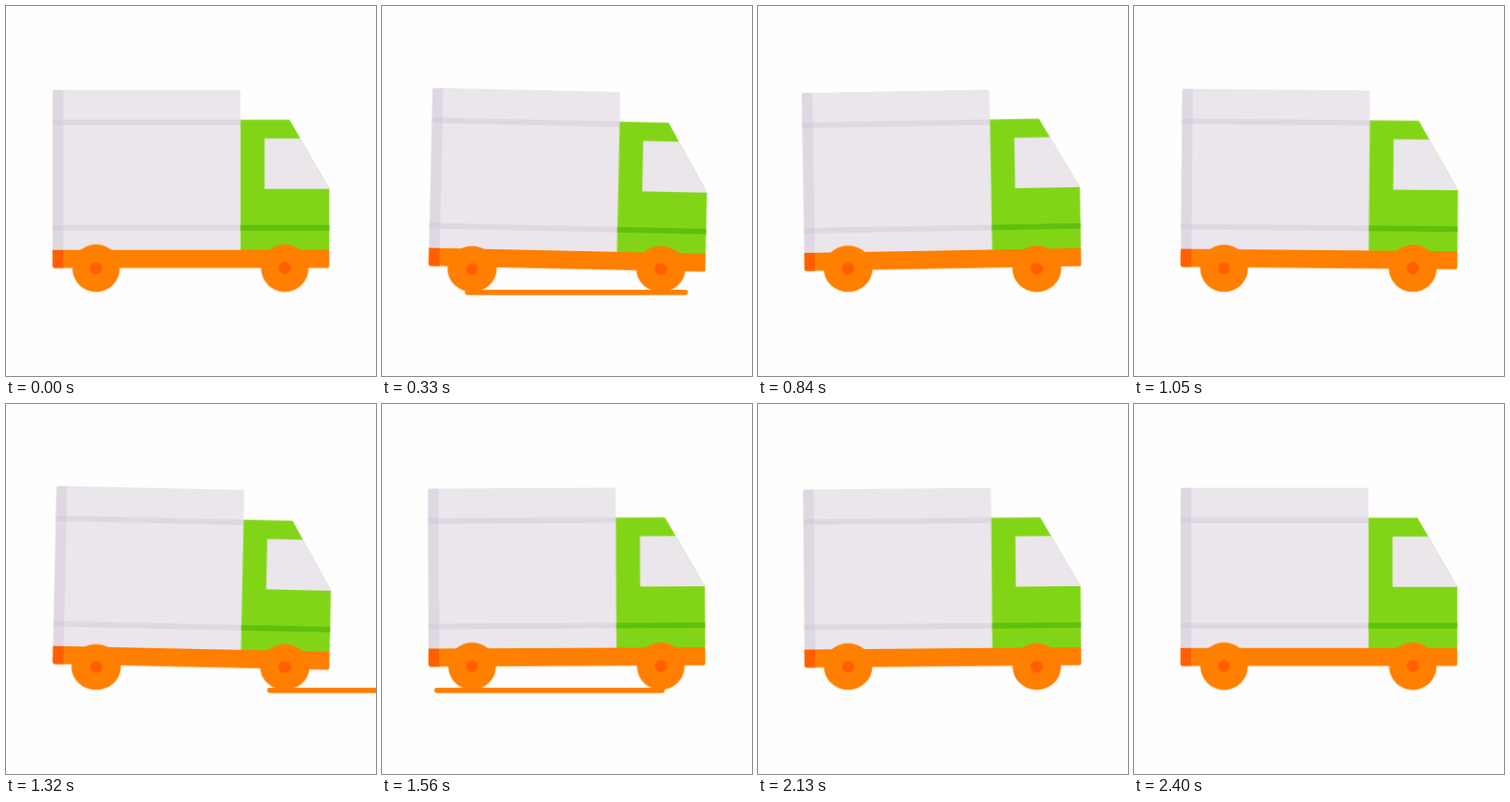
Animation, 400 px wide and 400 px high, one loop 2760 ms. Source, as an HTML page without scripts:

```html
<!DOCTYPE html>
<html lang="en">
<head>
<meta charset="utf-8">
<title>Delivery truck</title>
<style>
  html, body { margin: 0; width: 100%; height: 100%; overflow: hidden; background: #fefefe; }
  svg { display: block; width: 100%; height: 100%; }

  .body, .sway, .wheel, .road { animation: 2760ms cubic-bezier(.37, 0, .63, 1) infinite; }
  .body { animation-name: sink; }
  .sway { animation-name: sway; transform-origin: 200px 283.5px; }
  .wheel { animation-name: squash; transform-origin: 0 25.7px; }
  .road {
    animation-name: pass;
    animation-timing-function: steps(26);
    stroke: #ff7f00; stroke-width: 5.6; stroke-linecap: round;
  }
  .road.second { animation-delay: 1170ms; }

  .panel { fill: #eae6ec; }
  .shade { fill: #c8bcd0; opacity: .32; }
  .green { fill: #82d516; }
  .orange { fill: #ff7f00; }
  .deep { fill: #ff5f00; }

  @keyframes sway {
    0%, 86.96%, 100% { transform: rotate(0deg); }
    9.42% { transform: rotate(1.38deg); }
    26.09% { transform: rotate(-1.32deg); }
    45.29% { transform: rotate(1.32deg); }
    64.86% { transform: rotate(-1.25deg); }
  }
  @keyframes sink {
    0%, 17.75%, 35.69%, 55.07%, 86.96%, 100% { transform: translateY(-.3px); }
    9.42%, 26.09%, 45.29%, 64.86% { transform: translateY(.9px); }
  }
  @keyframes squash {
    0%, 17.75%, 35.69%, 55.07%, 86.96%, 100% { transform: scale(1, 1); }
    9.42%, 26.09%, 45.29%, 64.86% { transform: scale(1.045, .955); }
  }
  /* 26 ticks of 30 ms */
  @keyframes pass {
    0% { transform: translateX(0); }
    28.261%, 100% { transform: translateX(-733.6px); }
  }
</style>
</head>
<body>
<svg viewBox="0 0 400 400">
  <defs>
    <g id="wheel">
      <circle class="orange" r="25.7"/>
      <circle class="deep" r="6.5"/>
    </g>
  </defs>

  <line class="road" x1="402.8" x2="638.2" y1="309.6" y2="309.6"/>
  <line class="road second" x1="426.2" x2="669.5" y1="309.6" y2="309.6"/>

  <g class="body">
    <g class="sway">
      <path class="panel" d="M50.5 264V93q0-2 2-2H251.500q2 0 2 2V264z"/>
      <path class="shade" d="M50.500 264V93q0-2 2-2H62V264z"/>
      <path class="shade" d="M50.500 123H253.500v6H50.500zM50.500 237H253.500v6H50.500z"/>

      <path class="green" d="M253.500 123.300H306.500L349.500 198V264.500H253.500z"/>
      <path class="panel" d="M279.500 143.500H318.200L349.500 198H279.500z"/>
      <rect x="253.500" y="237" width="96" height="6" fill="#60c010"/>

      <path class="orange" d="M50.500 264H349.500V281.500q0 2-2 2H52.500q-2 0-2-2z"/>
      <path class="deep" d="M50.500 264H62V283.500H52.500q-2 0-2-2z"/>
    </g>
  </g>

  <g transform="translate(97.400 283.400)"><use class="wheel" href="#wheel"/></g>
  <g transform="translate(301.400 283.400)"><use class="wheel" href="#wheel"/></g>
</svg>
</body>
</html>
```
